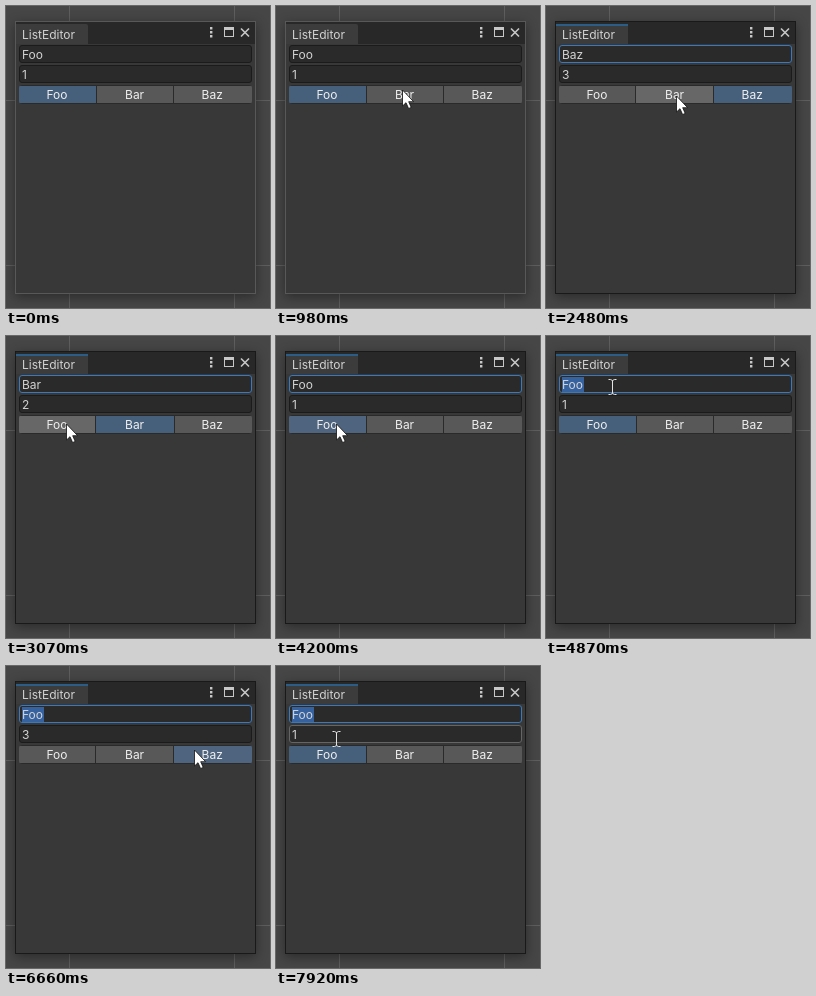
Write an HTML page that moves like this. It is 264 px wide and 302 px high and loops after 8 s.

```html
<!DOCTYPE html>
<html lang="en">
<head>
<meta charset="utf-8">
<title>ListEditor</title>
<style>
  html, body { margin: 0; width: 100%; height: 100%; overflow: hidden; background: #464646; }
  svg { display: block; }
  text { font: 12px Inter, "Liberation Sans", sans-serif; fill: #d2d2d2; }
  .grid { stroke: #5e5e5e; }
  .shadow { filter: drop-shadow(0 3px 6px rgba(0, 0, 0, .4)); }
  .frame { fill: none; stroke: #585858; }
  .tabline { fill: #2c5d87; visibility: hidden; }
  .focus .frame { stroke: #191919; }
  .focus .tabline { visibility: visible; }
  .field { fill: #2a2a2a; stroke: #1b1b1b; }
  .field.hot { stroke: #656565; }
  .focus #field0 { stroke: #3a79bb; }
  .btn rect { fill: #585858; stroke: #2a2a2a; }
  .btn.hot rect { fill: #676767; }
  .btn.on rect { fill: #46607c; }
  .btn.on.hot rect { fill: #4f657f; }
  .btn text { text-anchor: middle; fill: #eee; }
</style>
</head>
<body>
<svg id="stage" width="264" height="302" viewBox="0 0 264 302">
  <clipPath id="bar"><rect x="13" y="79" width="233" height="19" rx="3"/></clipPath>
  <rect width="264" height="302" fill="#464646"/>
  <path class="grid" d="M63.5 0V302M228.5 0V302M0 94.5H264M0 259.5H264"/>
  <rect class="shadow" x="9" y="15" width="241" height="273" fill="#383838"/>
  <rect x="10" y="16" width="239" height="22" fill="#282828"/>
  <path d="M10 38V18H80Q82 18 82 20V38Z" fill="#3c3c3c"/>
  <rect class="tabline" x="10" y="18" width="72" height="2"/>
  <rect class="frame" x="9.5" y="15.5" width="240" height="272"/>
  <text x="16" y="33">ListEditor</text>

  <path d="M205.2 21V32" stroke="#c8c8c8" stroke-width="2.4" stroke-dasharray="2.4 1.6"/>
  <path d="M218 21H228V31H218ZM219 24V30H227V24Z" fill="#c8c8c8" fill-rule="evenodd"/>
  <path d="M235 22.5L243 30.5M243 22.5L235 30.5" stroke="#c8c8c8" stroke-width="1.6"/>

  <rect class="field" id="field1" x="13.5" y="59.5" width="232" height="17" rx="2.5"/>
  <rect class="field" id="field0" x="13.5" y="39.5" width="232" height="17" rx="2.5"/>
  <rect id="mark" x="16" y="41" width="22" height="15" fill="#3662a0"/>
  <text id="name" x="16" y="53">Foo</text>
  <text id="value" x="16" y="73">1</text>
  <g id="row" clip-path="url(#bar)"></g>

  <g id="cursor">
    <circle id="press" cy="-1" r="12" fill="#d2d21e" fill-opacity=".7"/>
    <path id="arrow" d="M.5 0V16L4 12.7L6.6 18.5L9.2 17.4L6.7 11.7H11.6Z" fill="#fff" stroke="#111" stroke-width=".8"/>
    <path id="beam" d="M-3.5 -7.5H-1.5L.5 -6.5L2.5 -7.5H4.5M.5 -6.5V6.5M-3.5 7.5H-1.5L.5 6.5L2.5 7.5H4.5" fill="none" stroke="#e4e4e4"/>
  </g>
</svg>
<script>
const LOOP = 8000, ENTER = 320, PRESS = 65;
const names = ['Foo', 'Bar', 'Baz'];
const clicks = [1180, 1930, 2530, 3210, 4800, 5800, 6460, 7390];

// where the pointer comes to rest: arrival time, x, y
const stops = [
  [0, 247, 286], [790, 114, 98], [980, 126, 84], [1790, 234, 92],
  [2480, 130, 90], [3070, 60, 88], [4470, 66, 51], [5660, 112, 86],
  [6400, 196, 83], [6920, 120, 90], [7440, 60, 88], [7920, 60, 73]
];
stops[10][0] = 7340;

const $ = id => document.getElementById(id);
const show = (el, on) => el.setAttribute('visibility', on ? 'visible' : 'hidden');
const stage = $('stage'), row = $('row');

// neighbours overlap, so the selected one can cover both dividers
row.innerHTML = names.map((name, i) => `<g class="btn">
  <rect x="${11.5 + 78 * i}" y="79.5" width="79" height="18"/>
  <text x="${51 + 77.6 * i}" y="93">${name}</text></g>`).join('');
const buttons = [...row.children];

// each move takes longer the further it goes
function position(t) {
  let [, x, y] = stops[0];
  for (const [arrive, nx, ny] of stops.slice(1)) {
    const time = Math.min(470, 140 + 2.4 * Math.hypot(nx - x, ny - y));
    const k = Math.min(1, Math.max(0, 1 - (arrive - t) / time));
    const e = k * k * (3 - 2 * k);
    x += (nx - x) * e;
    y += (ny - y) * e;
    if (k < 1) break;
  }
  return [x, y];
}

const buttonAt = ([x, y]) => y < 79 || y >= 98 ? -1 : x < 90 ? 0 : x < 168 ? 1 : 2;

function state(t) {
  const s = { selected: 0, name: 0, down: null, focus: false, marked: false };
  for (const press of clicks.filter(c => c <= t)) {
    const target = buttonAt(position(press));
    s.focus = true;
    if (target < 0) s.marked = true;
    if (t < press + PRESS) s.down = target;
    else if (target >= 0) {
      s.selected = target;
      if (!s.marked) s.name = target; // text being edited keeps its content
    }
  }
  return s;
}

function draw(t) {
  const s = state(t);
  const [x, y] = position(t);
  const inField = y < 78;
  const hot = s.focus ? buttonAt([x, y]) : -1;

  stage.classList.toggle('focus', s.focus);
  buttons.forEach((b, i) => {
    b.classList.toggle('on', i === s.selected || i === s.down);
    b.classList.toggle('hot', i === hot && i !== s.down);
  });
  row.append(...buttons, buttons[s.selected]);
  $('field1').classList.toggle('hot', y > 59 && inField);
  $('name').textContent = names[s.name];
  $('value').textContent = s.selected + 1;
  show($('mark'), s.marked);

  const seen = t >= ENTER;
  $('cursor').setAttribute('transform', `translate(${Math.round(x)} ${Math.round(y)})`);
  show($('press'), seen && s.down !== null);
  show($('arrow'), seen && !inField);
  show($('beam'), seen && inField);
}

const start = performance.now();
function tick() {
  draw((performance.now() - start) % LOOP);
  requestAnimationFrame(tick);
}
tick();
</script>
</body>
</html>
```
